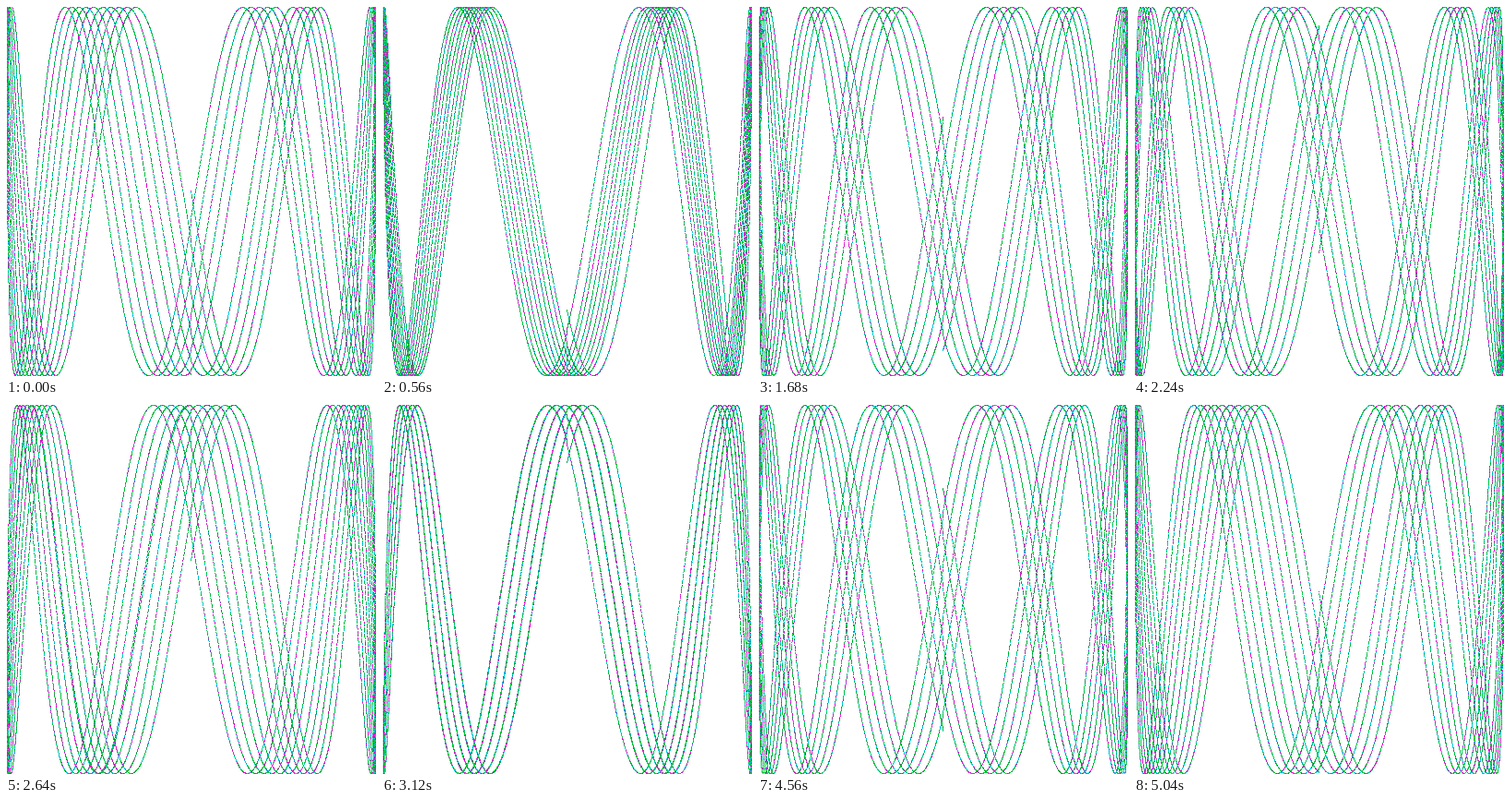
Write an HTML page with a canvas that moves like this. It is 401 by 401 pixels and loops after 5.12 s.

```html
<!DOCTYPE html>
<html>
<head>
<meta charset="utf-8">
<title>Lissajous</title>
<style>
  html, body { margin: 0; overflow: hidden; background: #fff; }
  canvas { display: block; }
</style>
</head>
<body>
<canvas id="stage" width="401" height="401"></canvas>
<script>
const SIZE = 200, WIDTH = 2 * SIZE + 1;
const CYCLES = 5, RES = 0.001, FREQ = 6.046602879796196;
const FRAMES = 64, DELAY = 80, PHASE_STEP = 0.1;

// Packed as ABGR; green is drawn twice as often as the others
const GREEN = 0xff3cbe00, MAGENTA = 0xffc800dc, CYAN = 0xffdcc800;
const INKS = [GREEN, MAGENTA, GREEN, CYAN];

const ctx = document.getElementById('stage').getContext('2d');
const image = ctx.createImageData(WIDTH, WIDTH);
const pixels = new Uint32Array(image.data.buffer);

function randomizer(seed) {
  let s = Math.imul(seed + 1, 0x9e3779b1);
  return () => {
    s ^= s << 13;
    s ^= s >>> 17;
    s ^= s << 5;
    return s >>> 0;
  };
}

const toPixel = v => SIZE + Math.trunc(v * SIZE + 0.5);

function draw(step) {
  const random = randomizer(step), phase = step * PHASE_STEP;
  pixels.fill(0xffffffff);
  for (let t = 0; t < CYCLES * 2 * Math.PI; t += RES) {
    const x = toPixel(Math.sin(t)), y = toPixel(Math.sin(t * FREQ + phase));
    pixels[y * WIDTH + x] = INKS[random() >>> 30];
  }
  ctx.putImageData(image, 0, 0);
}

let shown = -1;
function tick() {
  const step = Math.floor(performance.now() / DELAY) % FRAMES;
  if (step !== shown) draw(shown = step);
  requestAnimationFrame(tick);
}
tick();
</script>
</body>
</html>
```
